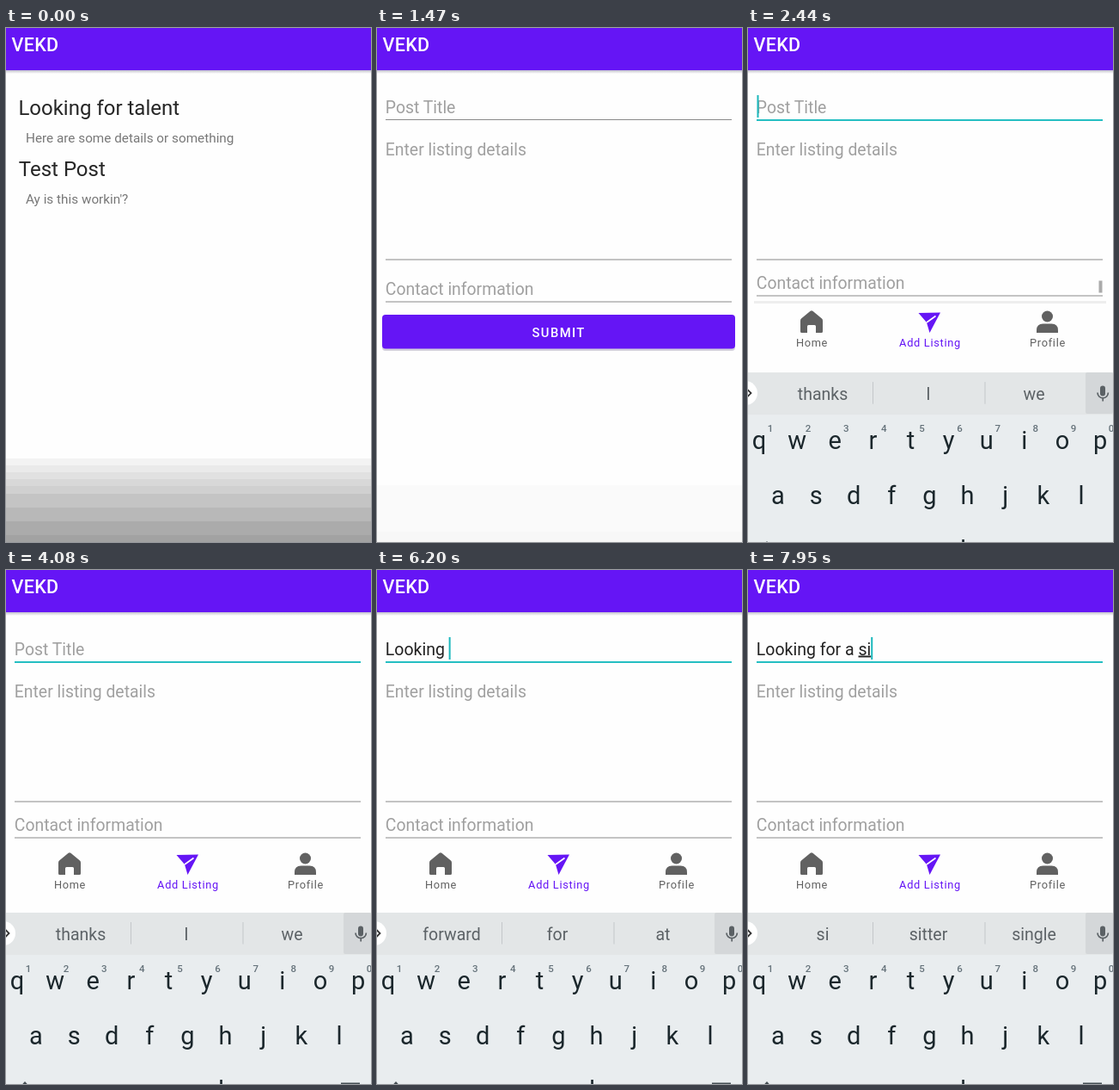
Animation, 425 px wide and 597 px high, one loop 8000 ms. Source, as an HTML page:

```html
<!DOCTYPE html>
<html lang="en">
<head>
<meta charset="utf-8">
<title>New listing</title>
<style>
  html, body { margin: 0; width: 100%; height: 100%; overflow: hidden; background: #fefefe; }
  svg { display: block; width: 100%; height: 100%; font-family: Roboto, sans-serif; }
  text { white-space: pre; }
  .mid { text-anchor: middle; }
  .hint { font-size: 19.4px; fill: #a0a0a0; }
  .post { font-size: 24px; fill: #262626; }
  .sub { font-size: 15.3px; fill: #777; }
  .nav { font-size: 12.8px; letter-spacing: .7px; }
  .key { font-size: 29px; fill: #1b272c; }
  .num { font-size: 11.5px; font-weight: 500; fill: #65727a; }
  .word { font-size: 19.5px; fill: #5c6266; }
  .typed { font-size: 19.5px; fill: #222; }
  .typed .compose { text-decoration: underline; text-decoration-thickness: 1px; }

  .shade, .strip, .list, .form, .contact, .focus, .bar, .caret { animation: 8s step-end infinite; }
  .shade { animation-name: shade; }
  .strip { animation-name: strip; }
  .list { animation-name: list; }
  .form { animation-name: form; }
  .contact { animation-name: contact; }
  .focus { animation-name: focus; }
  .bar { animation-name: bar; }
  .caret { animation-name: blink; }
  .keyboard { animation: slide 8s linear infinite; }
  .thumb { animation: thumb 8s linear infinite; }

  @keyframes shade { 0% { opacity: 1 } .75% { opacity: .55 } 1.875% { opacity: .22 } 3%, 100% { opacity: 0 } }
  @keyframes strip { 0% { fill: #f0f0f0 } 5.25%, 100% { fill: #f7f7f7 } }
  @keyframes list { 0% { visibility: visible } 18.375%, 100% { visibility: hidden } }
  @keyframes form { 0% { visibility: hidden } 18.375%, 100% { visibility: visible } }
  @keyframes contact { 0% { transform: none } 28.25%, 100% { transform: translateY(-7px) } }
  @keyframes focus { 0% { visibility: hidden } 27.5%, 100% { visibility: visible } }
  @keyframes bar { 0% { visibility: hidden } 28.25%, 100% { visibility: visible } }
  @keyframes slide {
    0% { transform: translateY(200px) }
    27.5% { transform: translateY(200px); animation-timing-function: cubic-bezier(0, .4, .1, 1) }
    31.25%, 100% { transform: none }
  }
  @keyframes thumb { 0%, 28.24% { opacity: 0 } 28.25%, 31.25% { opacity: 1 } 36%, 100% { opacity: 0 } }
  @keyframes blink {
    0% { opacity: 0 } 27.5% { opacity: 1 } 34% { opacity: 0 } 40.25% { opacity: 1 }
    46.375% { opacity: 0 } 52.5% { opacity: 1 } 58.625% { opacity: 0 } 64.75% { opacity: 1 }
    82.75% { opacity: 0 } 89%, 100% { opacity: 1 }
  }
</style>
</head>
<body>
<svg viewBox="0 0 425 597" preserveAspectRatio="none">
  <defs>
    <linearGradient id="drop" x2="0" y2="1">
      <stop stop-color="#c0bfcc"/><stop offset="1" stop-color="#fefefe"/>
    </linearGradient>
  </defs>
  <rect width="425" height="597" fill="#fefefe"/>
  <rect y="531" width="425" height="66" fill="#fafafa"/>
  <rect class="strip" y="585" width="425" height="12"/>
  <g id="shade" class="shade"></g>

  <rect y="49" width="425" height="4" fill="url(#drop)"/>
  <rect width="425" height="49" fill="#6515f5"/>
  <text x="6.5" y="27" font-size="21.5" font-weight="500" letter-spacing=".3" fill="#fff">VEKD</text>

  <g class="list">
    <text class="post" x="14.4" y="101">Looking for talent</text>
    <text class="sub" x="23" y="133">Here are some details or something</text>
    <text class="post" x="14.8" y="172">Test Post</text>
    <text class="sub" x="23" y="204">Ay is this workin'?</text>
  </g>

  <g class="form">
    <text id="title" class="hint" x="9.8" y="98.500">Post Title</text>
    <rect x="10" y="106" width="403" height="1" fill="#8a8a8a"/>
    <text class="hint" x="9.8" y="147.500">Enter listing details</text>
    <rect x="10" y="268.5" width="403" height="1" fill="#8a8a8a"/>
    <g class="contact">
      <text class="hint" x="9.8" y="310">Contact information</text>
      <rect x="10" y="317.5" width="403" height="1" fill="#8a8a8a"/>
      <rect x="6" y="335" width="411" height="40" rx="4" fill="#d3d0dc"/>
      <rect x="6" y="333" width="411" height="39.5" rx="4" fill="#6515f5"/>
      <text x="180.5" y="359" font-size="14.8" font-weight="500" letter-spacing="1.4" fill="#fff">SUBMIT</text>
    </g>
  </g>

  <g class="focus">
    <rect x="10" y="106" width="403" height="2" fill="#25bec2"/>
    <text id="typed" class="typed" x="9.8" y="98.500"><tspan></tspan><tspan class="compose"></tspan></text>
    <rect id="caret" class="caret" x="10.5" y="78" width="2" height="26" fill="#1bb8bc"/>
  </g>

  <g class="bar">
    <rect y="316" width="425" height="281" fill="#fefefe"/>
    <g class="thumb">
      <rect x="7" y="317" width="410" height="3" fill="#eee"/>
      <rect x="408.5" y="293.500" width="4" height="14" fill="#aaa"/>
    </g>
    <g fill="#616161">
      <path d="M72.600 328.800Q74 327.700 75.400 328.800L86 337.600Q87 338.500 87 340V352.500Q87 354 85.500 354H79V346.500Q79 345 77.500 345H70.500Q69 345 69 346.500V354H62.500Q61 354 61 352.500V340Q61 338.500 62 337.600Z"/>
      <circle cx="348.500" cy="335" r="6.500"/>
      <path d="M336 354V351Q336 343.500 343.500 343.500H353.500Q361 343.500 361 351V354Z"/>
      <text class="nav mid" x="74.500" y="370">Home</text>
      <text class="nav mid" x="349" y="370">Profile</text>
    </g>
    <g fill="#6515f5">
      <path d="M198.500 331L224 330.500L211.500 354L208 342Z"/>
      <path d="M208 342L218.500 334.500" stroke="#fefefe" stroke-width="1.600"/>
      <text class="nav mid" x="212" y="370">Add Listing</text>
    </g>
  </g>

  <g class="keyboard">
    <rect y="398" width="425" height="200" fill="#e9edef"/>
    <rect y="398" width="425" height="49" fill="#e3e6e7"/>
    <rect x="393" y="398" width="32" height="48" rx="2" fill="#d4d7d9"/>
    <circle cx="-3" cy="422" r="14" fill="#fff"/>
    <path d="M-1 417.500L3.500 422L-1 426.500" fill="none" stroke="#333" stroke-width="1.800"/>
    <path d="M145.500 409V434.500M276 409V434.500" stroke="#c3c7c9"/>
    <rect x="410" y="413.500" width="6" height="12" rx="3" fill="#5b6165"/>
    <path d="M407 421.500A6.200 6.200 0 0 0 419.400 421.500M413.200 428V431.500" fill="none" stroke="#5b6165" stroke-width="1.700"/>
    <g id="words"></g>
    <g id="keys"></g>
    <path d="M22 594L31 604H13Z" fill="#444e53"/>
    <path d="M391 604V596.500H411V604" fill="none" stroke="#444e53" stroke-width="2"/>
  </g>
</svg>
<script>
  const $ = id => document.getElementById(id);
  const LOOP = 8000;

  function add(parent, tag, attrs, content = '') {
    const el = document.createElementNS('http://www.w3.org/2000/svg', tag);
    for (const k in attrs) el.setAttribute(k, attrs[k]);
    el.textContent = content;
    return $(parent).appendChild(el);
  }

  // Stepped shade along the bottom: [top, grey level]
  [[500, 243], [508, 234], [516, 225], [524, 216], [532, 208],
   [541, 196], [557, 184], [573, 171], [589, 162]].forEach(([y, v]) =>
    add('shade', 'rect', { y, width: 425, height: 597 - y, fill: `rgb(${v},${v},${v})` }));

  [['qwertyuiop', 13, 487], ['asdfghjkl', 35, 551], ['zxcvbnm', 79, 614]].forEach(([row, x, y], r) =>
    [...row].forEach((c, i) => {
      add('keys', 'text', { class: 'key mid', x: x + i * 44.12, y }, c);
      if (!r) add('keys', 'text', { class: 'num mid', x: 26 + i * 44.12, y: 467 }, (i + 1) % 10);
    }));

  const words = [87, 210, 333].map(x => add('words', 'text', { class: 'word mid', x, y: 429.5 }));

  const phrase = 'Looking for a si';
  const hints = [
    'thanks|I|we', 'L|Love|Let', 'Lo|Love|Lol', 'Loo|Look|Looking', 'Look|Looking|Looks',
    'Looki|Looking|Lookin', 'Lookin|Looking|Looks', 'Looking|Looked|Looks', 'forward|for|at',
    'f|for|from', 'fo|for|food', 'for|four|form', 'a|the|you', 'a|an|and',
    'new|few|good', 's|so|some', 'si|sitter|single'
  ];

  // Characters entered by one burst of eight key presses
  const burst = (t, start, gap) => Math.max(0, Math.min(8, 1 + Math.floor((t - start) / gap)));

  const [done, compose] = $('typed').children;
  let shown = -1;

  function show(n) {
    if (n === shown) return;
    shown = n;
    const text = phrase.slice(0, n);
    const cut = text.lastIndexOf(' ') + 1;
    done.textContent = text.slice(0, cut);
    compose.textContent = text.slice(cut);
    $('title').style.display = n ? 'none' : '';
    $('caret').setAttribute('x', n ? 9.7 + $('typed').getComputedTextLength() : 10.5);
    hints[n].split('|').forEach((w, i) => words[i].textContent = w);
  }

  let start;
  function tick(now) {
    start ??= now;
    const t = (now - start) % LOOP;
    show(burst(t, 5360, 111) + burst(t, 7120, 110));
    requestAnimationFrame(tick);
  }
  show(0);
  requestAnimationFrame(tick);
</script>
</body>
</html>
```
